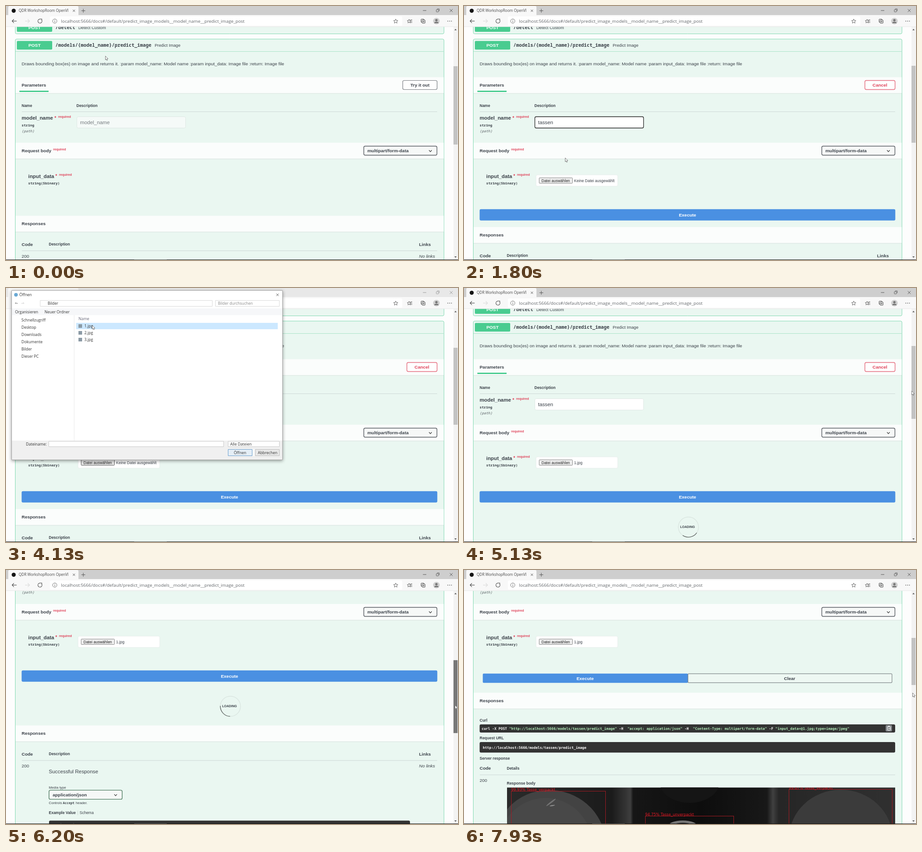
These frames come from a looping animation (998 by 561 pixels, 8 s). An HTML page with a canvas:

```html
<!DOCTYPE html>
<html lang="en">
<head>
<meta charset="utf-8">
<title>API docs demo</title>
<style>
html, body { margin: 0; width: 100%; height: 100%; overflow: hidden; background: #fdfdfd; }
canvas { display: block; }
</style>
</head>
<body>
<canvas id="stage" width="998" height="561"></canvas>
<script>
const W = 998, H = 561, LOOP = 8000;
const INK = '#3b4149', RED = '#df4158', GREEN = '#49cc90', MINT = '#eaf7f1', BLUE = '#4a90e2';
const SANS = '"Liberation Sans", Arial, sans-serif';
const MONO = '"Noto Sans Mono", monospace';
const HEAVY = '"DejaVu Sans Mono", monospace';
const UI = '"Open Sans", sans-serif';
const S = 9.93, SMALL = 8.5, BIG = 11.34, TINY = 7.09, CODE = 7.76;

// Moments of the story, in ms
const TRY = 600, FOCUS = 980, TYPE = 1080, PICK = 2800, OPEN = 3430, FILLED = 3590,
      CHOSEN = 4250, RUN = 4730, DRAG = 5180, DROP = 6600, DONE = 7530;

const POINTER = [
  [70, 219, 110], [500, 912, 172], [660, 912, 172], [940, 224, 255], [1430, 224, 255],
  [1600, 223, 335], [1800, 223, 335], [2330, 205, 390], [3620, 205, 390], [3950, 190, 82],
  [4230, 190, 82], [4600, 490, 458], [4780, 490, 458], [5100, 988, 227], [DRAG, 988, 227],
  [5670, 991, 272], [6200, 991, 298], [DROP, 991, 298], [7000, 990, 271]
];
const SCROLL = [[DRAG, 0], [5670, 127.4], [6200, 227]];
const SPIN = [[RUN, 25], [5130, 169], [5670, 365], [6200, 587], [DONE, 1066]];
const FADE = [[OPEN, 0], [3530, 0.48], [3650, 1], [CHOSEN, 1], [4360, 0]];

const stage = document.getElementById('stage');
const screen = stage.getContext('2d');
let c = screen;

const linear = k => k;
const smooth = k => k * k * (3 - 2 * k);

// Values of a keyed track at time t
function at(keys, t, ease = linear) {
  const i = keys.findIndex(k => k[0] > t);
  if (i === 0) return keys[0].slice(1);
  if (i < 0) return keys[keys.length - 1].slice(1);
  const a = keys[i - 1], b = keys[i];
  const k = ease((t - a[0]) / (b[0] - a[0]));
  return a.slice(1).map((v, j) => v + (b[j + 1] - v) * k);
}

// y is the middle of the capitals
function text(s, x, y, size = S, { color = INK, style = '', font = SANS, align = 'left' } = {}) {
  c.font = `${style} ${size}px ${font}`;
  c.fillStyle = color;
  c.textAlign = align;
  c.fillText(s, x, y + size * 0.36);
}
const bold = (s, x, y, size, o) => text(s, x, y, size, { style: 'bold', ...o });
const mono = (s, x, y, size = CODE, o) => text(s, x, y, size, { style: 'bold', font: MONO, ...o });
const code = (s, x, y, color = '#fff') => mono(s, x, y, CODE, { font: HEAVY, color });

function rect(x, y, w, h, fill) {
  c.fillStyle = fill;
  c.fillRect(x, y, w, h);
}
function box(x, y, w, h, r, fill, stroke, width = 1) {
  c.beginPath();
  c.roundRect(x, y, w, h, r);
  if (fill) { c.fillStyle = fill; c.fill(); }
  if (stroke) { c.strokeStyle = stroke; c.lineWidth = width; c.stroke(); }
}
function line(points, color, width = 1) {
  c.beginPath();
  points.forEach(([x, y], i) => i ? c.lineTo(x, y) : c.moveTo(x, y));
  c.strokeStyle = color;
  c.lineWidth = width;
  c.stroke();
}
function disc(x, y, r, fill) {
  c.beginPath();
  c.arc(x, y, r, 0, Math.PI * 2);
  c.fillStyle = fill;
  c.fill();
}
function ring(x, y, r, color, width = 1, from = 0, to = Math.PI * 2) {
  c.beginPath();
  c.arc(x, y, r, from, to);
  c.strokeStyle = color;
  c.lineWidth = width;
  c.stroke();
}
const rule = y => rect(35, y, 917, 0.8, 'rgba(59,65,81,.22)');
const cross = (x, y, r, color) => {
  line([[x - r, y - r], [x + r, y + r]], color, 0.9);
  line([[x + r, y - r], [x - r, y + r]], color, 0.9);
};

function section(y, title) {
  rect(21, y, 945.5, 35.3, 'rgba(255,255,255,.82)');
  rect(21, y + 35.3, 945.5, 1, 'rgba(0,0,0,.09)');
  bold(title, 34.5, y + 17);
}
function select(x, y, label, edge = '#55595f') {
  box(x, y, 161.5, 20, 3, '#f6f8f7', edge, 1.4);
  bold(label, x + 8, y + 10.3);
  line([[x + 144, y + 9], [x + 147, y + 12.3], [x + 150, y + 9]], '#333', 1.2);
}
function summary(y, path, note) {
  box(24, y - 9.5, 78, 19, 2, GREEN);
  bold('POST', 63, y, S, { color: '#fff', align: 'center' });
  mono(path, 109, y, 10.4);
  text(note, 109 + path.length * 6.24 + 7, y, 9.22);
}
function required(x, y, star) {
  if (star) bold('*', x - 8, y + 3, 10, { color: RED });
  bold('required', x, y, TINY, { color: RED });
}

function drawForm(t) {
  const open = t >= TRY, focused = t >= FOCUS && t < PICK;
  text('Draws bounding box(es) on image and returns it. :param model_name: Model name :param input_data: Image file :return: Image file', 34.5, 127);

  section(157.3, 'Parameters');
  rect(29.5, 187, 64.5, 3, GREEN);
  if (open) {
    box(885.2, 164.5, 66.5, 20, 3, '#fefefe', '#e46a7b', 1.4);
    bold('Cancel', 918.3, 174.5, S, { color: RED, align: 'center' });
  } else {
    box(876, 164.5, 75.8, 20, 3, '#fefefe', '#777b80', 1.2);
    bold('Try it out', 914, 174.5, S, { align: 'center' });
  }
  bold('Name', 34.5, 219.5, SMALL);
  bold('Description', 155.5, 219.5, SMALL);
  rule(233);
  bold('model_name', 34.5, 247, BIG);
  required(115, 244, true);
  mono('string', 34.5, 263);
  text('(path)', 34.5, 276, CODE, { style: 'italic', font: MONO, color: '#555b60' });

  box(156.5, 244.5, 240, 25, 3, open ? '#fff' : '#f5faf8',
      focused ? '#222' : '#dde6e2', focused ? 1.3 : 0.9);
  const typed = 'tassen'.slice(0, Math.max(0, Math.floor((t - TYPE) / 75) + 1));
  if (typed) text(typed, 163.5, 257, BIG);
  else text('model_name', 163.5, 257, BIG, { color: open ? '#8b8f93' : '#777c80' });

  section(302, 'Request body');
  required(104, 316);
  select(790, 309.5, 'multipart/form-data');
  bold('input_data', 49, 375.5, BIG);
  required(117, 372.5, true);
  mono('string($binary)', 49, 391.5);
  if (!open) return;

  const pressed = t >= PICK && t < CHOSEN;
  box(159, 373, 180.5, 25, 3, '#fff', '#e3eae7', 0.8);
  box(166, 379.5, 73.5, 12, 1, pressed ? '#e4e4e4' : '#efefef', pressed ? '#5a5a5a' : '#858585');
  text('Datei auswählen', 171, 385.6, SMALL, { color: '#222' });
  text(t >= CHOSEN ? '1.jpg' : 'Keine Datei ausgewählt', 243, 385.6, SMALL);

  if (t >= DONE) {
    box(41.5, 455.7, 453, 20.6, 2, BLUE);
    bold('Execute', 267.5, 466, S, { color: '#fff', align: 'center' });
    box(494.5, 456.2, 450.5, 19.6, 2, '#eef8f3', '#7f8588', 1.2);
    bold('Clear', 719, 466, S, { align: 'center' });
  } else {
    box(34.5, 448.8, 917.8, 25, 3, BLUE);
    bold('Execute', 493.5, 461, S, { color: '#fff', align: 'center' });
  }
}

function drawSpinner(t) {
  const x = 495.5, y = 528, r = 22.3;
  const mid = (at(SPIN, t)[0] - 90) * Math.PI / 180;
  ring(x, y, r, 'rgba(85,85,85,.1)', 1.4);
  ring(x, y, r, 'rgba(0,0,0,.55)', 1.4, mid - Math.PI / 4, mid + Math.PI / 4);
  bold('LOADING', 493.5, 527.5, TINY, { align: 'center' });
}

function drawResponses(y) {
  section(y, 'Responses');
  bold('Code', 34.5, y + 62.7);
  bold('Description', 94.5, y + 62.7, SMALL);
  bold('Links', 912, y + 62.7);
  rule(y + 77);
  text('200', 34.5, y + 89.5);
  text('No links', 912, y + 89.5, S, { style: 'italic' });
  text('Successful Response', 94.5, y + 102, BIG);
  text('Media type', 94.5, y + 136.5, 7.8);
  select(95, y + 143, 'application/json', '#4c7a5f');
  text('Controls', 94.5, y + 171, 7.8);
  mono('Accept', 125.5, y + 171, 7.1, { style: '600' });
  text('header.', 154, y + 171, 7.8);
  bold('Example Value', 94.5, y + 193, SMALL);
  rect(158, y + 188, 0.8, 10, '#c5cfca');
  text('Schema', 162.5, y + 193, SMALL);
  box(95, y + 210, 797, 40, 3, '#333');
  code('"string($binary)"', 100, y + 219.5);
}

function drawPhoto(x, y) {
  c.save();
  c.beginPath();
  c.rect(x, y, 857, 300);
  c.clip();
  const glow = c.createLinearGradient(x, 0, x + 857, 0);
  [[0, '#2a2a2a'], [0.27, '#1b1b1b'], [0.305, '#333'], [0.318, '#3e3e3e'], [0.325, '#161616'],
   [0.5, '#0d0d0d'], [0.67, '#181818'], [0.685, '#404040'], [0.70, '#262626'], [1, '#303030']]
    .forEach(([k, col]) => glow.addColorStop(k, col));
  rect(x, y, 857, 300, glow);
  const dome = (dx, dy, rx, ry, fill, turn = 0) => {
    c.beginPath();
    c.ellipse(x + dx, y + dy, rx, ry, turn, 0, Math.PI * 2);
    c.fillStyle = fill;
    c.fill();
  };
  dome(96, 122, 122, 116, '#434343', 0.25);
  dome(84, 130, 104, 107, '#484848', 0.25);
  dome(97, 33, 13, 1.6, '#747474', -0.65);
  dome(100, 40, 6, 1.2, '#8c8c8c', -0.2);
  dome(737, 112, 114, 107, '#3b3b3b');
  dome(403, -12, 66, 46, '#151515');
  dome(388, 86, 33, 13, '#777');
  dome(388, 90, 28, 12, '#262626');
  const tag = (s, dx, dy, w) => {
    c.strokeStyle = '#a51a22';
    c.lineWidth = 1;
    c.strokeRect(x + dx + 0.5, y + dy + 0.2, w, 260);
    text(s, x + dx, y + dy - 3.5, 8.3, { color: '#dc1824', font: '"DejaVu Sans", sans-serif' });
  };
  tag('99.93% Tasse_verpackt', 9, 8, 208);
  tag('94.75% Tasse_unverpackt', 305, 63, 195);
  tag('99.87% Tasse_verpackt', 622, 4, 228);
  c.restore();
}

function drawResult(y) {
  section(y, 'Responses');
  bold('Curl', 34.5, y + 61, SMALL);
  box(34.5, y + 70, 917.5, 18, 3, '#333');
  const parts = ['curl -X POST ', '"http://localhost:5666/models/tassen/predict_image"', ' -H  ',
    '"accept: application/json"', ' -H  ', '"Content-Type: multipart/form-data"', ' -F ',
    '"input_data=@1.jpg;type=image/jpeg"'];
  let x = 39;
  parts.forEach((s, i) => {
    code(s, x, y + 79, i % 2 ? '#b4efbd' : '#fff');
    x += c.measureText(s).width;
  });
  box(931, y + 71.5, 14, 14, 2, '#858a8d');
  box(935, y + 74.5, 6.5, 8.5, 1, null, '#fff', 1);
  rect(936.5, y + 73.3, 3.5, 2.2, '#fff');
  rect(937, y + 78.5, 4.5, 1, '#fff');
  bold('Request URL', 34.5, y + 100, SMALL);
  box(34.5, y + 109, 917.5, 23.3, 3, '#333');
  code('http://localhost:5666/models/tassen/predict_image', 41.5, y + 120.8);
  bold('Server response', 34.5, y + 144.8, SMALL);
  bold('Code', 34.5, y + 166.5);
  bold('Details', 94.5, y + 166.5, SMALL);
  rule(y + 181);
  text('200', 34.5, y + 193.5);
  bold('Response body', 94.5, y + 200, SMALL);
  drawPhoto(95, y + 209.3);
}

function drawPage(t, scroll) {
  c.save();
  c.beginPath();
  c.rect(0, 46, 988, 514);
  c.clip();
  c.translate(0, -scroll);
  box(20.5, 20.5, 946.5, 41, 3, MINT, '#7fd9b0');
  summary(47.5, '/detect', 'Detect Custom');
  box(20.5, 73, 946.5, 1500, 3, MINT, '#7fd9b0');
  rect(21, 100, 945.5, 1, '#a9e3c8');
  summary(86.7, '/models/{model_name}/predict_image', 'Predict Image');
  drawForm(t);
  if (t < TRY) drawResponses(463.3);
  else if (t < RUN) drawResponses(488.3);
  else if (t < DONE) {
    drawSpinner(t);
    drawResponses(570.4);
  } else drawResult(498);
  c.restore();
}

function drawScrollbar(t, scroll) {
  rect(988, 46, 10, 514, '#f3f3f3');
  const arrow = (y, d) => {
    c.beginPath();
    c.moveTo(990, y + d);
    c.lineTo(995, y + d);
    c.lineTo(992.5, y - d);
    c.fillStyle = '#555';
    c.fill();
  };
  arrow(52, 1.4);
  arrow(554.5, -1.4);
  const [top, size] = t < TRY ? [133, 173] : t < RUN ? [132, 170]
    : t < DONE ? [128 + scroll / 3.19, 161] : [150, 104];
  rect(988, top, 9, size, t >= DRAG && t < DROP ? '#787878' : '#c3c3c3');
}

function drawBrowser(active) {
  const frame = active ? '#555' : '#999';
  rect(0, 0, W, 20, active ? '#cecece' : '#e8e8e8');
  box(5, 0, 155, 24, [3, 3, 0, 0], '#f8f8f8');
  rect(0, 20, W, 26, '#f8f8f8');
  box(97, 23, 778, 20.5, 3, '#fff');
  rect(0, 45.5, W, 0.7, '#e2e2e2');
  disc(17, 10.5, 4.5, '#151515');
  c.save();
  c.beginPath();
  c.rect(28, 0, 110, 20);
  c.clip();
  text('QDR WorkshopRoom OpenVINO', 28, 10.5, 8.1, { font: UI, color: '#444' });
  c.restore();
  cross(150, 10.5, 2.4, '#444');
  line([[166.5, 10.5], [175, 10.5]], frame);
  line([[170.7, 6.3], [170.7, 14.7]], frame);
  line([[920.5, 10], [928, 10]], frame);
  box(950, 8, 5, 5, 1, null, frame, 0.9);
  line([[951.8, 6.4], [956.6, 6.4], [956.6, 11.2]], frame, 0.9);
  cross(983, 10, 3.2, frame);

  const arrow = (x, d, color) => {
    line([[x - 5 * d, 33.3], [x + 5 * d, 33.3]], color, 1.1);
    line([[x - 1 * d, 29.2], [x - 5 * d, 33.3], [x - 1 * d, 37.4]], color, 1.1);
  };
  arrow(18.5, 1, '#444');
  arrow(47, -1, '#dadada');
  ring(75, 33.3, 4.5, '#444', 1.1, -0.4, 4.9);
  line([[75.6, 28.8], [79, 28.8], [79, 32]], '#444', 1.1);
  ring(107.7, 33.3, 4.7, '#666', 0.9);
  rect(107.3, 32.4, 1, 3.5, '#666');
  rect(107.3, 30.3, 1, 1.1, '#666');
  text('localhost:5666/docs#/default/predict_image_models__model_name__predict_image_post',
       121.5, 33.5, 9.82, { font: UI, color: '#62666a' });

  const star = (x, y, r) => {
    const pts = Array.from({ length: 11 }, (_, i) => {
      const a = -Math.PI / 2 + i * Math.PI / 5, q = i % 2 ? r * 0.45 : r;
      return [x + q * Math.cos(a), y + q * Math.sin(a)];
    });
    line(pts, '#555', 0.9);
  };
  star(860.5, 33.8, 5);
  star(890, 33.8, 4.4);
  [30.5, 33.5, 36.5].forEach(y => line([[892.5, y], [897, y]], '#555', 0.9));
  box(916.5, 29, 6.5, 7, 1, null, '#444', 1);
  box(918.8, 31, 6.5, 7, 1, '#f8f8f8', '#444', 1);
  line([[922, 32.5], [922, 36.5]], '#444', 0.9);
  line([[920, 34.5], [924, 34.5]], '#444', 0.9);
  disc(950.3, 33.4, 7.2, '#cfcfcf');
  disc(950.3, 31.3, 2.6, '#777');
  c.beginPath();
  c.ellipse(950.3, 38, 4.6, 3.2, 0, Math.PI, 0);
  c.fill();
  [975.5, 979.5, 983.5].forEach(x => disc(x, 33.4, 0.9, '#555'));
}

// File chooser, painted once so that it can fade as one piece
function makeDialog(filled) {
  const sheet = document.createElement('canvas');
  sheet.width = W;
  sheet.height = H;
  c = sheet.getContext('2d');
  const label = (s, x, y, color = '#333') => text(s, x, y, SMALL, { font: UI, color });
  c.shadowColor = 'rgba(0,0,0,.4)';
  c.shadowBlur = 7;
  c.shadowOffsetY = 2;
  rect(12, 5, 599, 375, '#fff');
  c.shadowColor = 'transparent';
  rect(12, 337, 599, 43, '#f0f0f0');
  box(12.5, 5.5, 598, 374, 0, null, '#a5a5a5');
  disc(22, 15, 4, '#6aa9d4');
  label('Öffnen', 29.5, 15);
  cross(599.5, 15, 2.6, '#444');
  rect(94, 338, 386, 12, '#fff');
  rect(490, 338, 114, 12, '#f7f7f7');
  rect(490, 356, 114, 15, '#f8f8f8');
  if (filled) fillDialog(label);
  c = screen;
  return sheet;
}

function fillDialog(label) {
  line([[26, 34], [20, 34], [22.5, 31.5]], '#777');
  line([[34, 34], [40, 34], [37.5, 31.5]], '#ccc');
  box(75.5, 27.5, 380, 13, 0, '#fff', '#d9d9d9');
  label('Bilder', 92, 34);
  box(462.5, 27.5, 141, 13, 0, '#fff', '#d9d9d9');
  label('Bilder durchsuchen', 468, 34, '#888');
  rect(13, 45, 597, 15, '#f6f7f9');
  label('Organisieren', 20, 52.5);
  label('Neuer Ordner', 85, 52.5);
  ['Schnellzugriff', 'Desktop', 'Downloads', 'Dokumente', 'Bilder', 'Dieser PC']
    .forEach((s, i) => label(s, 34, 71 + i * 16));
  rect(150, 60, 0.8, 277, '#e4e4e4');
  label('Name', 160, 68, '#667');
  rect(155, 77, 445, 14, '#cce8ff');
  [1, 2, 3].forEach((n, i) => {
    rect(160, 80 + i * 15, 8, 8, '#8b9aa5');
    label(n + '.jpg', 173, 84 + i * 15);
  });
  label('Dateiname:', 44, 344.5);
  box(94.5, 338.5, 386, 12, 0, '#fff', '#c9c9c9');
  box(490.5, 338.5, 113, 12, 0, '#fff', '#c9c9c9');
  label('Alle Dateien', 495, 344.5);
  box(490.5, 356.5, 53, 14, 0, '#e5eef6', '#6a9fce');
  label('Öffnen', 503, 363.5);
  box(550.5, 356.5, 53, 14, 0, '#e8e8e8', '#bbb');
  label('Abbrechen', 556, 363.5);
}

function drawPointer(t) {
  const dragging = t >= DRAG && t < 6200;
  const [x, y] = at(POINTER, t, dragging ? linear : smooth);
  c.save();
  c.translate(x, y);
  const overInput = t >= TRY && t < 1600 && x > 157 && x < 396 && y > 245 && y < 269;
  if (overInput) {
    line([[-2, -5], [2, -5]], '#555', 0.9);
    line([[0, -5], [0, 5]], '#555', 0.9);
    line([[-2, 5], [2, 5]], '#555', 0.9);
  } else {
    c.beginPath();
    [[0.5, 0.5], [0.5, 9], [2.4, 7.3], [3.7, 10.2], [5, 9.6], [3.8, 6.8], [6.4, 6.6]]
      .forEach(p => c.lineTo(...p));
    c.closePath();
    c.fillStyle = '#fff';
    c.fill();
    c.strokeStyle = '#6b6b6b';
    c.lineWidth = 0.9;
    c.stroke();
  }
  c.restore();
}

const shell = makeDialog(false);
const chooser = makeDialog(true);

function draw(t) {
  const [scroll] = at(SCROLL, t);
  rect(0, 0, W, H, '#fdfdfd');
  drawPage(t, scroll);
  drawScrollbar(t, scroll);
  drawBrowser(t < OPEN || t >= CHOSEN);
  rect(0, 560, W, 1, '#111');
  rect(283, 560, 72, 1, '#4a4a4a');
  const [alpha] = at(FADE, t);
  if (alpha > 0) {
    c.globalAlpha = alpha;
    c.drawImage(t < FILLED ? shell : chooser, 0, 0);
    c.globalAlpha = 1;
  }
  drawPointer(t);
}

const start = performance.now();
function tick(now) {
  draw(Math.max(0, now - start) % LOOP);
  requestAnimationFrame(tick);
}
draw(0);
requestAnimationFrame(tick);
</script>
</body>
</html>
```
